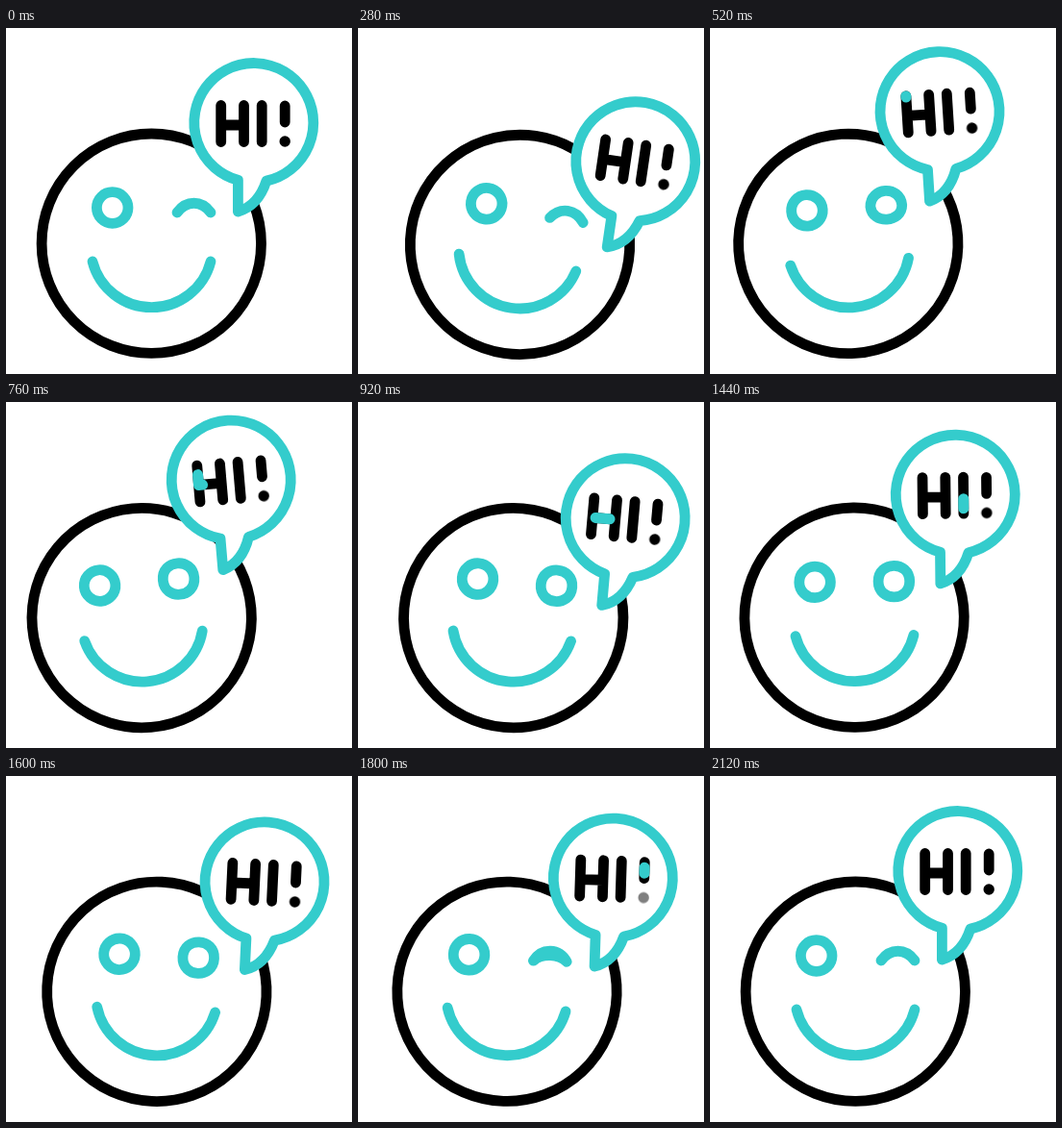
Animation, 360 px wide and 360 px high, one loop 2.8 s. Source, as an HTML page:

```html
<!DOCTYPE html>
<html lang="en">
<head>
<meta charset="utf-8">
<title>Winking smiley says hi</title>
<style>
  html, body { margin: 0; width: 100%; height: 100%; overflow: hidden; background: #fff; }
  svg { display: block; width: 100vw; height: 100vh; }
  svg * { stroke-linecap: round; stroke-linejoin: round; }
  .ink, .teal { fill: none; stroke-width: 10.8px; }
  .ink { stroke: #000; }
  .teal { stroke: #34cccc; }

  .face, .bubble, .eye, .mark, .dot { animation: 2800ms linear infinite; }

  /* Both parts rock on the point where the face meets the ground. */
  .face, .bubble {
    transform-origin: 151.3px 343px;
    animation-timing-function: cubic-bezier(.37, 0, .63, 1);
  }
  .face { animation-name: rock; }
  .bubble { animation-name: rock, bob; }
  .bubble .teal { fill: #fff; }

  @keyframes rock {
    0%, 70.71%, 100% { rotate: 0deg; }
    10.71% { rotate: 8.4deg; }
    23.21% { rotate: -8.7deg; }
    34.82% { rotate: 6deg; }
    45.36% { rotate: -3deg; }
    59.29% { rotate: 3deg; }
  }
  @keyframes bob {
    0%, 70.71%, 100% { translate: 0 0; }
    10.71% { translate: -3.3px 22.5px; }
    23.21% { translate: -3px -17.4px; }
    34.82% { translate: -.5px 14px; }
    45.36% { translate: 0 -6.7px; }
    59.29% { translate: 0 7px; }
  }

  .eye {
    d: path("M-17.5 5C-8 -8 8 -8 17.5 5C8 -8 -8 -8 -17.5 5Z");
    animation-name: wink;
    animation-timing-function: cubic-bezier(.37, 0, .63, 1);
  }
  @keyframes wink {
    0%, 12.86%, 65.71%, 100% { d: path("M-17.5 5C-8 -8 8 -8 17.5 5C8 -8 -8 -8 -17.5 5Z"); }
    20%, 60% { d: path("M-18.8 0C-18.8 -21.7 13.8 -21.7 13.8 0C13.8 21.7 -18.8 21.7 -18.8 0Z"); }
  }

  /* A short teal dash runs along each letter in turn. */
  .bubble .mark { fill: none; stroke-width: 11px; stroke-dasharray: 10 200; visibility: hidden; }
  .bubble .m1 { stroke-dasharray: 15 200; animation-name: run-h; }
  .m2 { animation-name: run-i; }
  .bubble .m3 { stroke-dasharray: 6 200; animation-name: run-bang; }
  @keyframes run-h {
    0%, 18.57% { visibility: hidden; stroke-dashoffset: 14; }
    27.14% { visibility: visible; stroke-dashoffset: -9.5; }
    40% { visibility: visible; stroke-dashoffset: -41; }
    47.14%, 100% { visibility: hidden; stroke-dashoffset: -65; }
  }
  @keyframes run-i {
    0%, 47.14% { visibility: hidden; stroke-dashoffset: 9; }
    50% { visibility: visible; }
    53.57%, 100% { visibility: hidden; stroke-dashoffset: -38; }
  }
  @keyframes run-bang {
    0%, 60.71% { visibility: hidden; stroke-dashoffset: 6; }
    64% { visibility: visible; }
    67.86%, 100% { visibility: hidden; stroke-dashoffset: -17; }
  }

  .dot { animation-name: fade; }
  @keyframes fade {
    0%, 61.43%, 68.57%, 100% { opacity: 1; }
    64.29% { opacity: .5; }
  }
</style>
</head>
<body>
<svg viewBox="0 0 360 360">
  <g class="face">
    <circle class="ink" cx="151.3" cy="224.2" r="114.2"/>
    <circle class="teal" cx="110.7" cy="187" r="16.3"/>
    <g transform="translate(195.5 187)">
      <path class="teal eye"/>
    </g>
    <path class="teal" d="M90 243A63.5 63.5 0 0 0 213 243"/>
  </g>
  <g class="bubble">
    <path class="teal" d="M241.4 158.3A62 62 0 1 1 270.9 159.1Q262.4 185 241.4 191Z"/>
    <path class="ink" d="M223.7 80.5V118.5M247.5 80.5V118.5M223.7 101H247.5M266.2 80.5V118.5M290.2 81V98"/>
    <circle class="dot" cx="290.2" cy="118" r="5.7"/>
    <path class="teal mark m1" d="M223.7 80.5V101H247.5V80.5"/>
    <path class="teal mark m2" d="M266.2 80.5V118.5"/>
    <path class="teal mark m3" d="M290.2 81V98"/>
  </g>
</svg>
</body>
</html>
```
